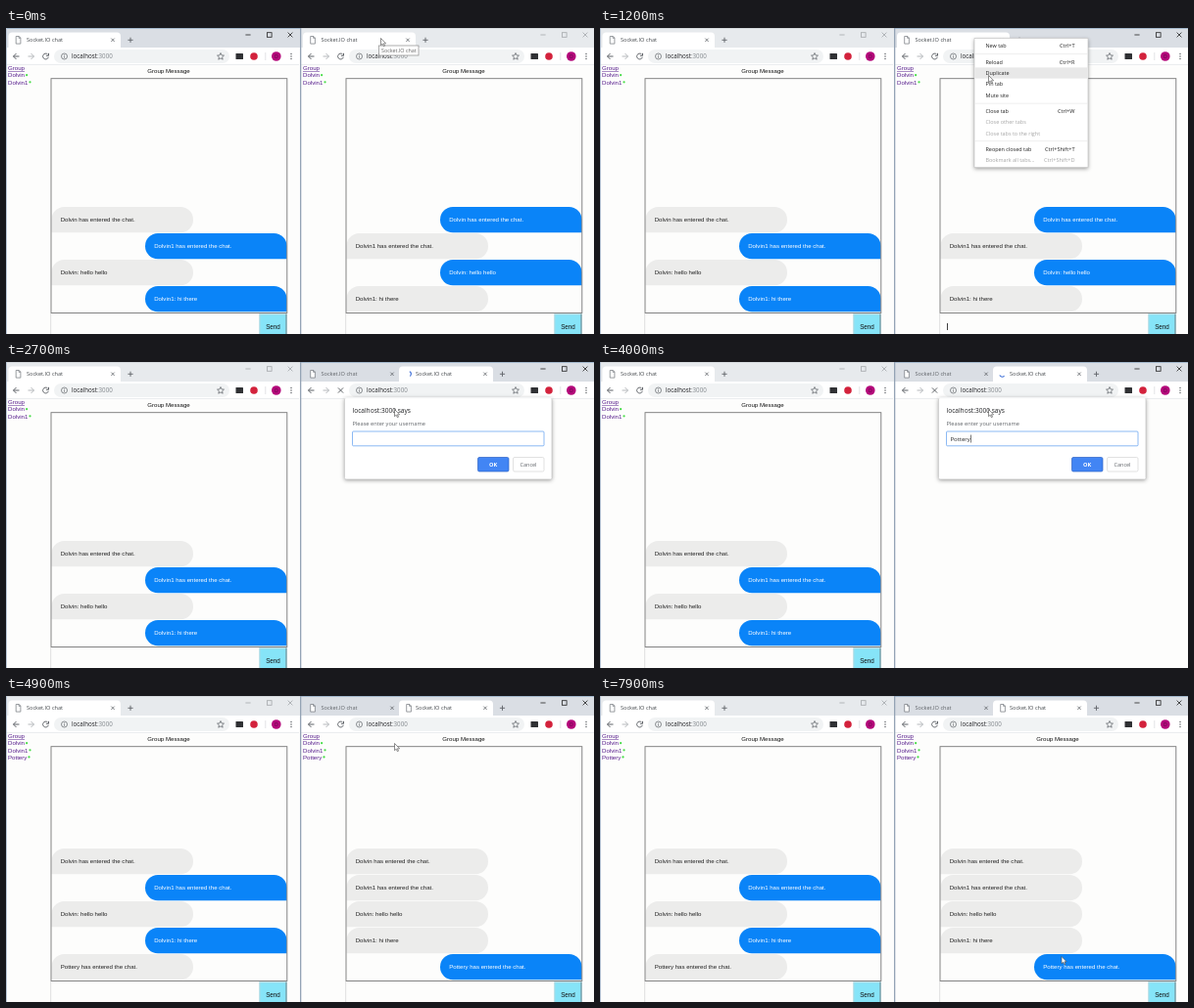
Animation of 600 by 313 pixels, one loop 8 s. Source, as an HTML page with a canvas:

```html
<!DOCTYPE html>
<html lang="en">
<head>
<meta charset="utf-8">
<title>Group chat in two windows</title>
<style>
  html, body { margin: 0; width: 100%; height: 100%; overflow: hidden; background: #fdfdfc; }
  canvas { display: block; width: 100%; height: 100%; }
</style>
</head>
<body>
<canvas></canvas>
<script>
const LOOP = 8000;
const UI = '"Open Sans", sans-serif', PAGE = '"Liberation Sans", Arial, sans-serif';
const INK = '#202124', DIM = '#5f6368', TITLE = 'Socket.IO chat', NEWCOMER = 'Pottery';

// Times at which the scene changes, in ms
const FOCUS = 100, MENU = 600, DUPLICATE = 1600, PROMPT = 2150, TYPE = 2900,
      ACCEPT = 4200, LOADED = 4300, JOINED = 4700;

const MESSAGES = [
  ['Dolvin', 'Dolvin has entered the chat.'],
  ['Dolvin1', 'Dolvin1 has entered the chat.'],
  ['Dolvin', 'Dolvin: hello hello'],
  ['Dolvin1', 'Dolvin1: hi there'],
  [NEWCOMER, NEWCOMER + ' has entered the chat.'],
];

// [label, shortcut, centre y, disabled]
const MENU_ITEMS = [
  ['New tab', 'Ctrl+T', 18], ['Reload', 'Ctrl+R', 34.5], ['Duplicate', '', 46],
  ['Pin tab', '', 57.3], ['Mute site', '', 68.5], ['Close tab', 'Ctrl+W', 85],
  ['Close other tabs', '', 96.3, true], ['Close tabs to the right', '', 107.5, true],
  ['Reopen closed tab', 'Ctrl+Shift+T', 124], ['Bookmark all tabs...', 'Ctrl+Shift+D', 135, true],
];

// [time, x, y]
const POINTER = [
  [0, 382.5, 10.5], [600, 382.5, 10.5], [1000, 396.5, 48.5], [6700, 396.5, 48.5],
  [7200, 466.5, 167], [7300, 466.5, 167], [7900, 471, 266.5],
];

const canvas = document.querySelector('canvas'), c = canvas.getContext('2d');
const clamp = v => Math.min(1, Math.max(0, v));

function text(str, x, y, size, color = INK, { font = UI, align = 'left', weight = 400 } = {}) {
  c.font = `${weight} ${size}px ${font}`;
  c.textAlign = align;
  c.fillStyle = color;
  c.fillText(str, x, y);
}
function rect(x, y, w, h, color) {
  c.fillStyle = color;
  c.fillRect(x, y, w, h);
}
function frame(x, y, w, h, color, width = 1) {
  c.strokeStyle = color;
  c.lineWidth = width;
  c.strokeRect(x, y, w, h);
}
function round(x, y, w, h, radii, fill, stroke) {
  c.beginPath();
  c.roundRect(x, y, w, h, radii);
  c.fillStyle = fill;
  c.fill();
  if (stroke) { c.strokeStyle = stroke; c.lineWidth = 0.7; c.stroke(); }
}
function circle(x, y, r, color) {
  c.beginPath();
  c.arc(x, y, r, 0, 7);
  c.fillStyle = color;
  c.fill();
}
function path(d, x, y, color, width = 0.9, fill) {
  const p = new Path2D(d);
  c.save();
  c.translate(x, y);
  if (fill) { c.fillStyle = fill; c.fill(p); }
  c.strokeStyle = color;
  c.lineWidth = width;
  c.stroke(p);
  c.restore();
}
const cross = (x, y, r, color, width) => path(`M${-r} ${-r}L${r} ${r}M${r} ${-r}L${-r} ${r}`, x, y, color, width);
const plus = (x, y) => path('M-2.6 0H2.6M0 -2.6V2.6', x, y, DIM);
function panel(x, y, w, h, radius) {
  c.save();
  c.shadowColor = 'rgba(0,0,0,.4)';
  c.shadowBlur = 4 * canvas.width / 600;
  c.shadowOffsetY = canvas.width / 600;
  round(x, y, w, h, radius, '#fff');
  c.restore();
  round(x, y, w, h, radius, '#fff', '#c4c4c4');
}

function tab(left, right, { active = true, spin = null, bare = false } = {}) {
  if (active) round(left, 4.5, right - left, 16, [4, 4, 0, 0], '#fff');
  if (!bare) {
    if (spin === null) path('M-2.3 -3.8H.8L2.4 -2.2V3.8H-2.3ZM.6 -3.8V-2H2.4', left + 10, 12.3, '#70757a', 0.7, '#fff');
    else {
      c.beginPath();
      c.arc(left + 9.5, 12.3, 2.8, spin - 1.1, spin + 0.9);
      c.strokeStyle = '#4272d8';
      c.lineWidth = 1.1;
      c.stroke();
    }
    text(TITLE, left + (active && left > 90 ? 17 : 18.5), 14.4, 5.6, active ? '#45494d' : DIM);
  }
  cross(right - 8, 12.3, 1.7, DIM, 0.8);
}

function toolbar(loading) {
  rect(0, 20, 299, 18, '#fff');
  rect(0, 37.3, 299, 0.7, '#e3e5e8');
  path('M3 0H-3M0 -3L-3 0L0 3', 10.5, 29, DIM, 1);
  path('M-3 0H3M0 -3L3 0L0 3', 25.5, 29, '#b5b8bb', 1);
  if (loading) cross(40.5, 29, 2.6, DIM, 1);
  else path('M2 -2.1A2.9 2.9 0 1 0 2.8 .8M3 -3.2V-.7H.5', 40.5, 29, DIM, 1);
  round(49, 22, 179, 14, 7, '#f1f3f4');
  path('M3 0A3 3 0 1 1 -3 0A3 3 0 1 1 3 0M0 -.5V1.7M0 -1.7V-1', 59.5, 29, DIM, 0.7);
  text('localhost', 67, 31.2, 6.2);
  text(':3000', 67 + c.measureText('localhost').width, 31.2, 6.2, '#80868b');
  path('M0 -3.5L1 -1.1L3.5 -.9L1.6 .8L2.2 3.2L0 1.9L-2.2 3.2L-1.6 .8L-3.5 -.9L-1 -1.1Z', 219, 29, DIM, 0.75);
  round(234.5, 26, 7.5, 6, 0.6, '#303134');
  circle(253, 29, 3.8, '#d3223c');
  rect(264.5, 25, 0.7, 8, '#d5d8dc');
  circle(275.8, 29, 4.8, '#b4087a');
  text('D', 275.8, 30.8, 5, '#5a1146', { align: 'center' });
  for (const dy of [-2.4, 0, 2.4]) circle(291, 29 + dy, 0.75, DIM);
}

function chat(me, messages, users) {
  const page = { font: PAGE };
  text('Group', 2, 43.4, 6.1, '#551a8b', page);
  rect(2, 44.1, 17, 0.5, '#551a8b');
  users.forEach((name, i) => {
    const y = 50.4 + i * 7.1;
    text(name, 2, y, 6.1, '#551a8b', page);
    circle(4.2 + c.measureText(name).width, y - 2.2, 1.1, '#45dd45');
  });
  text('Group Message', 166, 45.8, 6.1, '#111', { font: PAGE, align: 'center' });

  messages.forEach(([author, line], i) => {
    const mine = author === me, x = mine ? 142 : 46.5;
    const y = 264 - (messages.length - 1 - i) * 27;
    round(x, y, 144.5, 26.3, mine ? [13, 13, 0, 13] : [13, 13, 13, 0], mine ? '#0a84f8' : '#ececeb');
    text(line, x + 9.2, y + 15.2, 6.1, mine ? '#fff' : '#222', page);
  });
  frame(46, 51.7, 240.8, 239.8, '#777', 0.9);

  rect(45.5, 292, 0.6, 21, '#ccc');
  rect(258.5, 292.5, 28, 21, '#86e4f8');
  rect(258.5, 292.5, 28, 0.8, '#b9d5da');
  rect(258.5, 292.5, 0.8, 21, '#b9d5da');
  rect(285.5, 292.5, 1, 21, '#6d7f84');
  text('Send', 272.5, 307.7, 6.3, '#111', { font: PAGE, align: 'center' });
}

function browser(x, focused, loading, drawTabs, drawPage) {
  c.save();
  c.translate(x, 0);
  rect(0, 0, 299, 313, '#fdfdfc');
  rect(0, 0, 299, 20, focused ? '#dadee4' : '#e7eaed');
  rect(0, 0, 299, 0.7, focused ? '#8fa9c4' : '#d2d6da');
  drawTabs();
  const tint = focused ? '#222' : '#a4a7ab';
  path('M-2.6 0H2.6', 247, 7, tint, 0.8);
  frame(266.5, 4.7, 4.6, 4.6, tint, 0.8);
  cross(290, 7, 2.4, tint, 0.8);
  toolbar(loading);
  drawPage();
  c.restore();
}

function menu(pointerY) {
  panel(382, 10.5, 116, 132, 0);
  for (const y of [26.2, 76.8, 115.5]) rect(382.5, y, 115, 0.6, '#e4e4e4');
  for (const [label, keys, y, disabled] of MENU_ITEMS) {
    if (Math.abs(pointerY - y) < 5.6 && !disabled) rect(382.5, y - 5.6, 115, 11.2, '#e8e8e8');
    const color = disabled ? '#a5a5a5' : '#222';
    text(label, 393.5, y + 2, 5.45, color);
    text(keys, 484.5, y + 2, 5.6, color, { align: 'right' });
  }
}

function prompt(t) {
  panel(345.5, 36.5, 211.5, 83.5, 1.5);
  rect(345, 36, 213, 1.3, '#f4f5f6');
  text('localhost:3000 says', 353.5, 51.5, 6.6);
  text('Please enter your username', 353.5, 64.8, 5.67, DIM);
  round(353.5, 71, 195.5, 14.8, 1, '#fff', '#5b9bf0');
  const typed = NEWCOMER.slice(0, Math.max(0, Math.floor((t - TYPE) / 130)));
  text(typed, 357.5, 80.6, 6);
  const caretOn = t > TYPE || (t - PROMPT) % 1060 < 530;
  if (caretOn) rect(358 + c.measureText(typed).width, 74.5, 0.6, 8, '#222');
  round(481.5, 97.5, 31.5, 14.5, 1.5, '#4285f4', '#2d62c4');
  text('OK', 497.2, 106.8, 5.6, '#fff', { align: 'center', weight: 700 });
  round(517.5, 97.5, 31.5, 14.5, 1.5, '#fff', '#d5d5d5');
  text('Cancel', 533, 106.8, 5.5, DIM, { align: 'center' });
}

function pointerAt(t) {
  const i = Math.max(1, POINTER.findIndex(p => p[0] > t));
  if (t >= POINTER.at(-1)[0]) return POINTER.at(-1).slice(1);
  const [t0, x0, y0] = POINTER[i - 1], [t1, x1, y1] = POINTER[i];
  const p = clamp((t - t0) / (t1 - t0)), e = p * p * (3 - 2 * p);
  return [x0 + (x1 - x0) * e, y0 + (y1 - y0) * e];
}

function rightTabs(t) {
  if (t < DUPLICATE) {
    tab(2, 117);
    plus(127, 12.3);
    return;
  }
  const grow = clamp((t - DUPLICATE - 55) / 200), left = 117 - 17 * grow;
  tab(2, left - 0.5 + (1 - grow) * -1 + 1.5, { active: false });
  const right = 117 + 79 * grow;
  if (grow > 0) tab(left, right, { bare: grow < 0.8, spin: t < LOADED ? (t - 2700) / 160 : null });
  if (grow === 1) plus(205.5, 12.3);
}

function rightPage(t) {
  if (t >= DUPLICATE && t < LOADED) return;
  const duplicated = t >= LOADED, joined = t >= JOINED;
  const users = ['Dolvin', 'Dolvin1', NEWCOMER];
  if (!duplicated) chat('Dolvin', MESSAGES.slice(0, 4), users.slice(0, 2));
  else chat(NEWCOMER, joined ? MESSAGES : [], joined ? users : []);
  const caretOn = (t >= 200 && t < 700) || (t >= 1200 && t < DUPLICATE);
  if (caretOn) rect(53.2, 302, 0.8, 7, '#111');
}

function draw(t) {
  const k = canvas.width / 600;
  c.setTransform(k, 0, 0, canvas.height / 313, 0, 0);
  rect(0, 0, 600, 313, '#fdfdfc');

  const joined = t >= JOINED, rightFocused = t >= FOCUS;
  browser(1, !rightFocused, false, () => { c.translate(-1, 0); tab(2.5, 117); plus(127, 12.3); },
    () => chat('Dolvin1', joined ? MESSAGES : MESSAGES.slice(0, 4),
               ['Dolvin', 'Dolvin1', NEWCOMER].slice(0, joined ? 3 : 2)));
  browser(301, rightFocused, t >= DUPLICATE && t < LOADED, () => rightTabs(t), () => rightPage(t));
  rect(0, 0, 0.8, 313, '#a9bacd');
  rect(300, 0, 1.3, 313, '#94a3b5');

  const [px, py] = pointerAt(t);
  if (t < 200) {
    rect(380.5, 18, 40.5, 10, '#fff');
    frame(380.5, 18, 40.5, 10, '#8a8a8a', 0.7);
    text(TITLE, 383, 25, 5.4, '#666');
  }
  if (t >= MENU && t < DUPLICATE) menu(py);
  if (t >= PROMPT && t < ACCEPT) prompt(t);
  path('M0 0V7.2L1.7 5.7L2.9 8.2L4 7.7L2.9 5.3H5.1Z', px, py, '#444', 0.6, '#fff');
}

function tick() {
  const dpr = window.devicePixelRatio || 1;
  const w = Math.round(innerWidth * dpr), h = Math.round(innerHeight * dpr);
  if (canvas.width !== w || canvas.height !== h) { canvas.width = w; canvas.height = h; }
  draw(performance.now() % LOOP);
  requestAnimationFrame(tick);
}
tick();
</script>
</body>
</html>
```
